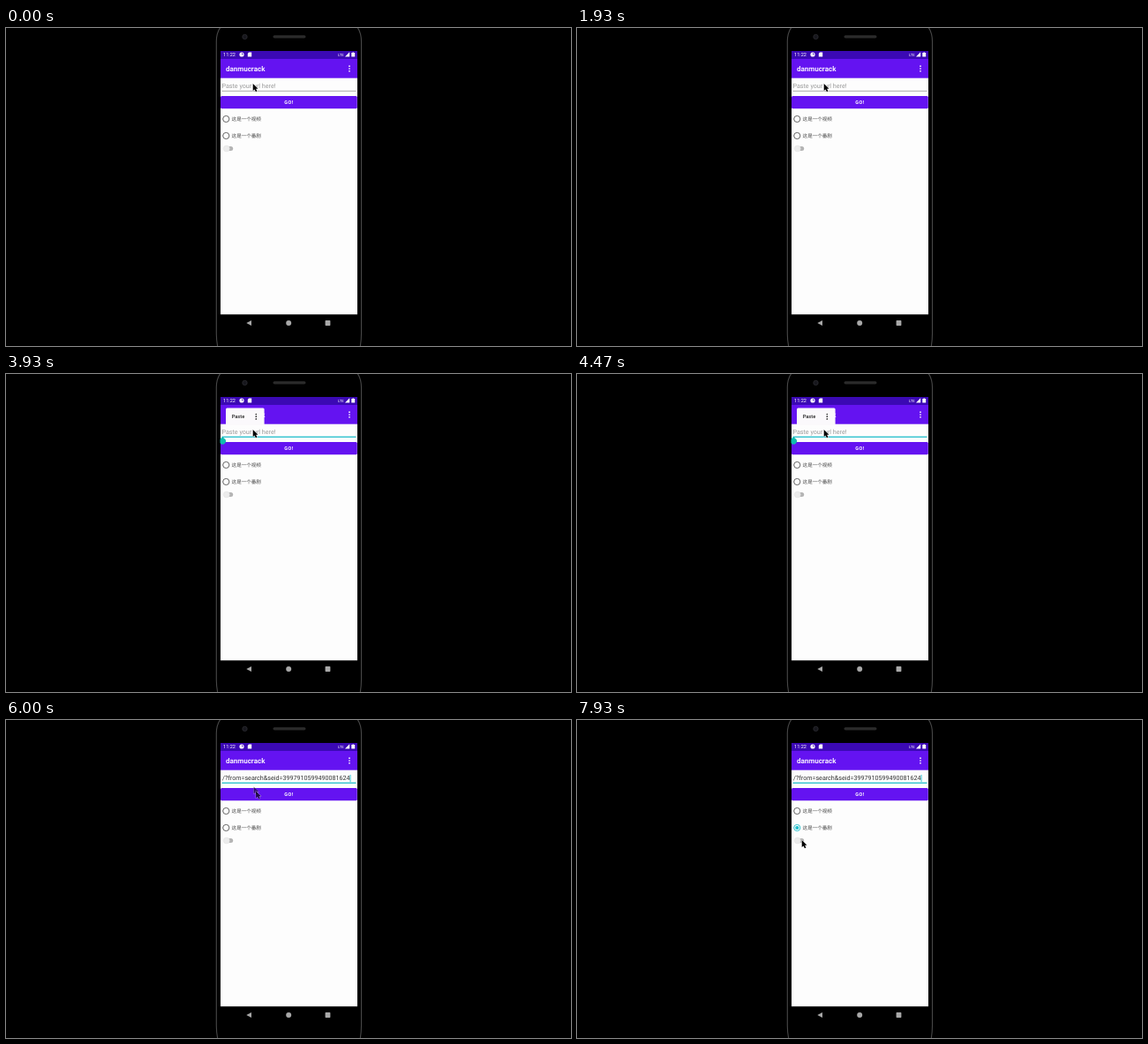
These frames come from a looping animation (640x360 px, 8 s). An HTML page:

```html
<!DOCTYPE html>
<html lang="en">
<head>
<meta charset="utf-8">
<title>Paste demo</title>
<style>
html, body { margin: 0; width: 100%; height: 100%; overflow: hidden; background: #000; }
svg { display: block; width: 100%; height: 100%; }
text { font-family: Roboto, sans-serif; }
.cjk { font: 500 5.55px "Noto Sans CJK SC", "Noto Sans CJK", sans-serif; fill: #444; }
.url { font-size: 7.15px; }
</style>
</head>
<body>
<svg viewBox="0 0 640 360" text-rendering="geometricPrecision">
  <defs>
    <clipPath id="screen"><rect x="242.5" y="26" width="155.5" height="298.5"/></clipPath>
    <path id="arrow" d="M0 0V8L1.9 6.4L3.2 9.3L4.7 8.6L3.4 5.8H5.8Z" fill="#000" stroke="#fff" stroke-width=".7" paint-order="stroke"/>
  </defs>
  <rect width="640" height="360" fill="#000"/>

  <!-- phone body -->
  <path d="M244 -2Q238.5 4 238.3 15V346Q238.3 354 240 362M397 -2Q402.3 4 402.5 15V346Q402.5 354 401 362" fill="none" stroke="#484848" stroke-width="1.1"/>
  <rect x="302.5" y="8.2" width="37" height="3.2" rx="1.6" fill="#2b2b2b"/>
  <circle cx="270.5" cy="10" r="2.7" fill="#17171d" stroke="#2b2b30" stroke-width=".8"/>
  <g fill="#a8a8a8">
    <path d="M272.3 334L278 330.9V337.1Z"/>
    <circle cx="320.2" cy="334" r="3"/>
    <rect x="361.6" y="331.1" width="5.8" height="5.8" rx=".6"/>
  </g>

  <g clip-path="url(#screen)">
    <rect x="243" y="26" width="155" height="298.5" fill="#fdfdfd"/>
    <rect x="243" y="26" width="155" height="9.5" fill="#3b09b4"/>
    <rect x="243" y="35" width="155" height="21.7" fill="#6413f1"/>

    <!-- status bar -->
    <g fill="#fff">
      <text x="246" y="32.2" font-size="5.6">11:22</text>
      <circle cx="267" cy="30" r="2.6"/>
      <path d="M267 30V28.4A1.6 1.6 0 0 1 268.6 30Z" fill="#3b09b4"/>
      <path d="M275 27.6H278.2V32.4H273.8V28.9Z"/>
      <text x="376" y="31.8" font-size="4.3">LTE</text>
      <path d="M384 32.4H389.2V27.3Z"/>
      <path d="M391.3 28.1H392.5V27.4H394V28.1H395.2V32.6H391.3Z"/>
    </g>

    <!-- toolbar -->
    <text x="249" y="48.9" font-size="8" font-weight="700" fill="#f6f0ff">danmucrack</text>
    <g fill="#fff"><circle cx="389" cy="43.2" r=".85"/><circle cx="389" cy="46" r=".85"/><circle cx="389" cy="48.8" r=".85"/></g>

    <!-- input -->
    <text id="hint" class="url" x="244.5" y="68.4" fill="#999">Paste your url here!</text>
    <text id="url" class="url" x="245" y="68.4" fill="#333">/?from=search&amp;seid=3997910599490081624</text>
    <rect id="line" x="244.5" width="152"/>
    <rect id="caret" y="62" width=".9" height="8.2" fill="#1fbecb"/>

    <rect x="243" y="77" width="154.8" height="14.2" rx="1.5" fill="#6413f1"/>
    <text x="320.6" y="86.1" font-size="5.5" font-weight="700" letter-spacing=".5" text-anchor="middle" fill="#fff">GO!</text>

    <!-- choices -->
    <g fill="none" stroke="#555" stroke-width=".9">
      <circle cx="249.3" cy="103" r="3.6"/>
      <circle id="ring" cx="249.3" cy="122" r="3.6"/>
    </g>
    <circle id="dot" cx="249.3" cy="122" r="2.1" fill="#1fbecb"/>
    <text class="cjk" x="255.6" y="105.1">这是一个视频</text>
    <text class="cjk" x="255.6" y="124.1">这是一个番剧</text>
    <rect x="247" y="134" width="10.2" height="5" rx="2.5" fill="#b4b4b4"/>
    <circle cx="249.8" cy="136.5" r="3.5" fill="#ececec" stroke="#dcdcdc" stroke-width=".4"/>

    <path id="handle" d="M245.3 71.3L248 73.4A3.7 3.7 0 1 1 242.6 73.4Z" fill="#10bdb0"/>

    <!-- paste menu -->
    <g id="menu">
      <rect x="249" y="38.6" width="43.6" height="19.2" rx="1.5" fill="#fbf9fc"/>
      <rect id="hover" x="249" y="38.6" width="25" height="19.2" rx="1.5" fill="#dadada"/>
      <text x="255.8" y="50.1" font-size="5.6" font-weight="500" fill="#222">Paste</text>
      <g fill="#333"><circle cx="283.3" cy="45.5" r=".85"/><circle cx="283.3" cy="48.2" r=".85"/><circle cx="283.3" cy="50.9" r=".85"/></g>
    </g>
  </g>
  <use id="trail" href="#arrow"/>
  <use id="mouse" href="#arrow"/>
</svg>
<script>
const LOOP = 8000, FOCUS = 2300, MENU = 3800, PASTE = 5750, PICK = 7150;
const TEAL = '#1fbecb';
// time, x, y of the pointer tip
const PATH = [
  [0, 279.7, 63], [4600, 279.7, 63], [5000, 264.7, 44.5], [5780, 264.7, 44.5],
  [6060, 288, 90], [6650, 288, 90], [6800, 291, 104], [6930, 282, 121],
  [7080, 262, 121], [7350, 262, 121], [7700, 254.7, 136], [8000, 254.7, 136]
];
const $ = id => document.getElementById(id);
const clamp = v => Math.max(0, Math.min(1, v));
const show = (id, a) => $(id).setAttribute('opacity', +a);
const set = (id, attrs) => { for (const k in attrs) $(id).setAttribute(k, attrs[k]); };

function pointer(t) {
  t = Math.max(0, t);
  const i = Math.max(1, PATH.findIndex(p => p[0] >= t));
  const [t0, x0, y0] = PATH[i - 1], [t1, x1, y1] = PATH[i];
  const u = (t - t0) / (t1 - t0);
  return [x0 + (x1 - x0) * u, y0 + (y1 - y0) * u];
}

function draw(t) {
  const focused = t >= FOCUS, pasted = t >= PASTE, picked = t >= PICK;
  const menu = clamp((t - MENU) / 130) * clamp((PASTE + 80 - t) / 80);

  show('hint', !pasted);
  show('url', pasted);
  set('line', focused ? { y: 70.6, height: 1.3, fill: TEAL } : { y: 70.9, height: .7, fill: '#888' });

  const since = t - (pasted ? PASTE : FOCUS);
  const caretOn = focused && since % 1000 < 500 && (pasted || t < MENU);
  show('caret', caretOn);
  set('caret', { x: pasted ? 389.6 : 244.3 });

  show('handle', t >= MENU && !pasted);
  show('menu', menu);
  show('hover', clamp((t - 4930) / 100));

  set('ring', { stroke: picked ? TEAL : '#555' });
  show('dot', picked);

  const [x, y] = pointer(t), [px, py] = pointer(t - 30);
  const moving = Math.hypot(x - px, y - py) > .5;
  set('mouse', { transform: `translate(${x} ${y})` });
  set('trail', { transform: `translate(${px} ${py})` });
  show('mouse', moving ? .65 : 1);
  show('trail', moving ? .5 : 0);
}

const start = performance.now();
function tick() {
  draw((performance.now() - start) % LOOP);
  requestAnimationFrame(tick);
}
tick();
</script>
</body>
</html>
```
